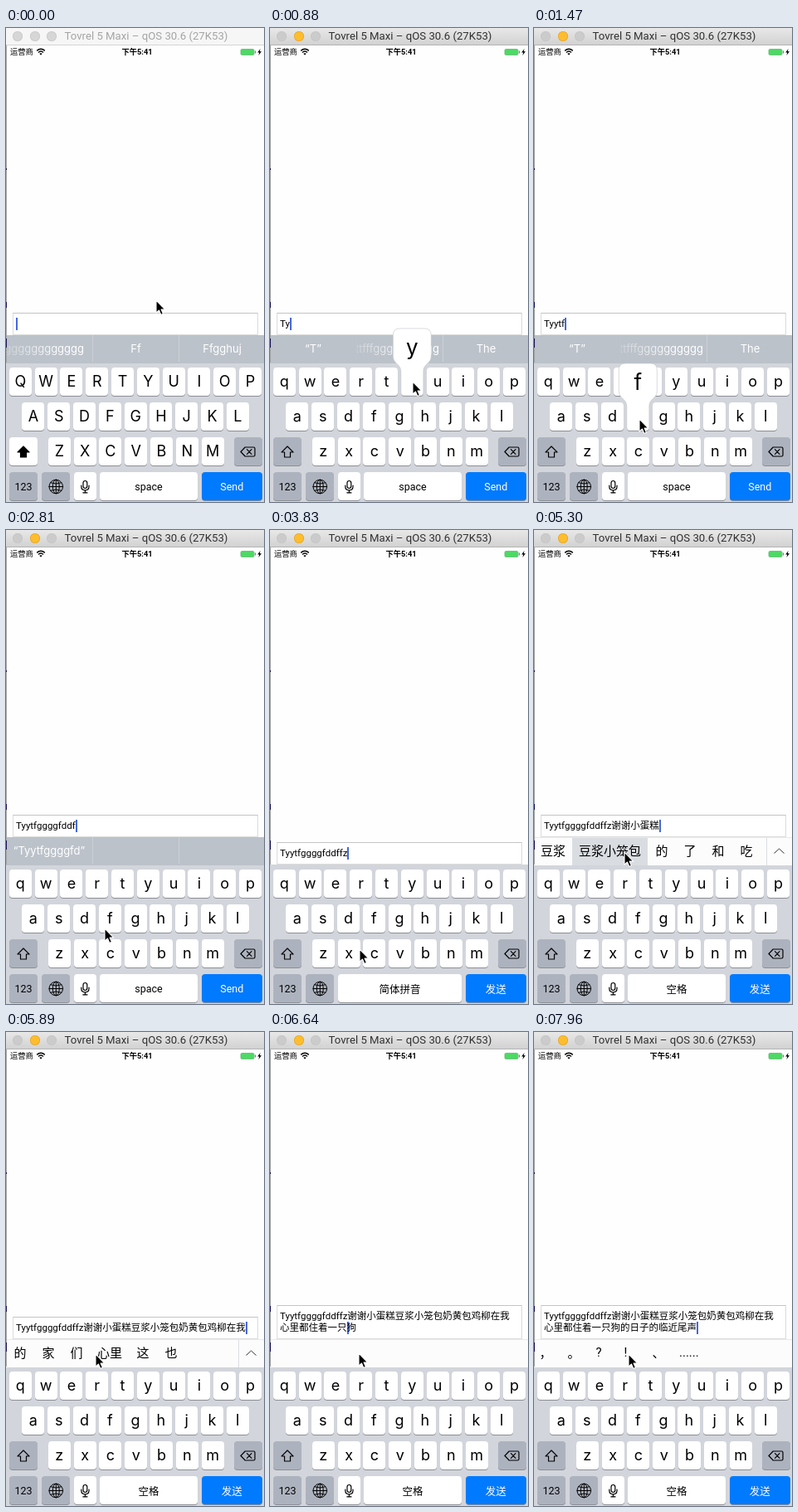
Animation, 311 px wide and 571 px high, one loop 8000 ms. Source, as an HTML page:

```html
<!DOCTYPE html>
<html lang="zh-CN">
<head>
<meta charset="utf-8">
<title>Keyboard demo</title>
<style>
html, body { margin: 0; width: 100%; height: 100%; overflow: hidden; background: #fff; }
#stage { position: absolute; left: 0; top: 0; width: 311px; height: 571px; overflow: hidden; background: #fefefe;
  font-family: Roboto, "Noto Sans CJK SC", "Noto Sans CJK", sans-serif; color: #000; }
#stage > * { position: absolute; box-sizing: border-box; }
#title { left: 0; top: 0; width: 311px; height: 21px; background: #f6f6f6; border-bottom: 1px solid #d4d4d4;
  font-size: 13.2px; line-height: 20px; text-align: center; padding-left: 27px; color: #a4a4a4; white-space: pre; }
#title i { position: absolute; top: 4px; width: 12px; height: 12px; border-radius: 50%; background: #d6d6d6;
  box-shadow: inset 0 0 0 .6px #c4c4c4; }
#title.on { background: linear-gradient(#e8e8e8, #d2d2d2); border-color: #b4b4b4; color: #303030; }
#title.on i { background: #cbcbcb; }
#title.on i:nth-of-type(2) { background: #fdbd2f; box-shadow: inset 0 0 0 .6px #dfa023; }
.status { top: 22px; font-size: 9.3px; line-height: 14px; white-space: pre; }
#field { left: 8px; width: 296px; background: #fff; border: 1px solid #dcdcdc; border-top-color: #c4c4c4;
  padding: 5px 0 0 3px; font-size: 11.5px; line-height: 14px; white-space: pre; }
#caret { display: inline-block; width: 2px; height: 15px; margin: -1px -2px -1px 0; vertical-align: -3px; background: #4468dc; }
#field u { text-decoration-color: #999; }
#board { left: 0; top: 403px; width: 311px; height: 168px; background: #d2d5db; }
#bar { left: 0; top: 370px; width: 311px; height: 34px; display: flex; overflow: hidden; }
#bar.en { background: #bbc2ca; color: #fff; font: 13px Inter, sans-serif; }
#bar.en div { width: 104px; height: 32px; flex: none; display: flex; align-items: center; justify-content: center;
  overflow: hidden; white-space: pre; box-sizing: border-box; }
#bar.en div + div { border-left: 1px solid #cbd0d6; }
#bar.en .long { justify-content: flex-end; padding-right: 4px;
  -webkit-mask-image: linear-gradient(90deg, rgba(0,0,0,.25), #000 65%); mask-image: linear-gradient(90deg, rgba(0,0,0,.25), #000 65%); }
#bar.en .long:first-child { padding-right: 10px; }
#bar.zh { background: #fcfcfd; border-top: 1px solid #e8e9eb; font-size: 15px; }
#bar.zh div { min-width: 34px; padding: 0 8px 4px; flex: none; box-sizing: border-box; display: flex; align-items: center; justify-content: center; }
#bar.zh span { min-width: 15px; }
#bar.plain span { transform: translateX(-3px); }
#bar.zh .press { background: #d9dce1; }
#bar svg { position: absolute; right: 0; top: 0; background: #fcfcfd; }
.key { height: 34px; border-radius: 4px; background: #fff; box-shadow: 0 1px 0 #8b8e93; display: flex;
  align-items: center; justify-content: center; font-size: 12.5px; white-space: pre; }
.letter { width: 27px; padding-bottom: 1px; font: 18px/1 Inter, sans-serif; }
.dark { background: #adb3be; }
.send { background: #007aff; color: #fff; }
.key.hit { background: #fff; }
svg { overflow: visible; }
</style>
</head>
<body>
<div id="stage">
  <div id="title"><i style="left:8px"></i><i style="left:29px"></i><i style="left:49px"></i>Tovrel 5 Maxi – qOS 30.6 (27K53)</div>
  <div class="status" style="left:5px">运营商</div>
  <div class="status" style="left:108px;width:100px;text-align:center;font-weight:700">下午5:41</div>
  <svg width="311" height="571" style="left:0;top:0">
    <g fill="none" stroke="#000" stroke-width="1.4">
      <path d="M37.2 27.4Q42 23.2 46.8 27.4M39 29.4Q42 26.7 45 29.4"/>
    </g>
    <path d="M40.3 30.8Q42 29.6 43.7 30.8L42 32.8Z"/>
    <rect x="283" y="25.5" width="16" height="7" rx="1.5" fill="#4cd964" stroke="#68b874" stroke-width=".8"/>
    <path d="M300.5 27.5v3" stroke="#777"/>
    <path d="M306.6 25L303.2 29.6H305.3L304.4 33L308 28.2H305.8Z"/>
  </svg>
  <div id="field"></div>
  <div id="board"></div>
  <div id="bar"></div>
  <svg id="icons" width="311" height="571" style="left:0;top:0;z-index:2">
    <path d="M.5 21V403" stroke="#a5a5a5"/>
    <path d="M.5 169v2M.5 330v7M.5 374v11" stroke="#1c1257"/>
    <path id="arrow" d="M21 504L28 511H24.5V517H17.5V511H14Z" stroke="#000" stroke-width="1.2" stroke-linejoin="round"/>
    <g fill="none" stroke="#000" stroke-width="1.2" stroke-linejoin="round" stroke-linecap="round">
      <path d="M283 510.5L288.2 505H298.5Q300 505 300 506.5V514.5Q300 516 298.5 516H288.2Z"/>
      <path d="M290.5 507.7L296 513.3M296 507.7L290.5 513.3"/>
      <g stroke-width="1">
        <circle cx="60.3" cy="552.5" r="8.3"/><ellipse cx="60.3" cy="552.5" rx="4" ry="8.3"/>
        <path d="M60.3 544.2V560.8M52 552.5H68.6M53.8 547.8Q60.3 550.5 66.8 547.8M53.8 557.2Q60.3 554.5 66.8 557.2"/>
      </g>
      <g id="mic"><rect x="93" y="545.5" width="4.8" height="9" rx="2.4"/>
        <path d="M90.8 551V552.5Q90.8 556.8 95.4 556.8T100 552.5V551M95.4 557V559.6M92.8 559.8H98"/></g>
    </g>
  </svg>
  <svg id="pop" width="1" height="1" style="left:0;top:0;z-index:3">
    <path d="M-23-39Q-23-47-15-47H15Q23-47 23-39V-14C23-4 13.5-5 13.5 5V30Q13.5 34 9.5 34H-9.5Q-13.5 34-13.5 30V5C-13.5-5-23-4-23-14Z"
      fill="#fff" stroke="#bfc3c9" stroke-width=".6"/>
    <text y="-15" text-anchor="middle" font-family="Inter, sans-serif" font-size="26"></text>
  </svg>
  <svg id="mouse" width="1" height="1" style="left:0;top:0;z-index:4">
    <path d="M0 0V15.2L3.5 12L5.8 17.4L8.4 16.3L6.1 11.1H10.8Z" stroke="#fff" stroke-width="1.1" stroke-linejoin="round"/>
  </svg>
</div>
<script>
const $ = id => document.getElementById(id);
const LOOP = 8000, WRAP = 32, PITCH = 30.8;
const TEXT = "Tyytfggggfddffz谢谢小蛋糕豆浆小笼包奶黄包鸡柳在我心里都住着一只狗的日子的临近尾声";

function addKey(x, y, w, label, cls) {
  const el = document.createElement("div");
  el.className = "key " + cls;
  el.style.cssText = `left:${x}px;top:${y}px;width:${w}px`;
  el.textContent = label;
  $("stage").insertBefore(el, $("icons"));
  return el;
}

const keys = {};
[["qwertyuiop", 3.8, 409], ["asdfghjkl", 19.4, 451], ["zxcvbnm", 50.8, 493]].forEach(([row, left, y]) =>
  [...row].forEach((c, i) => {
    const x = left + i * PITCH;
    keys[c] = { x: x + 13.5, y, el: addKey(x, y, 27, c, "letter") };
  }));
const shift = addKey(4, 493, 34, "", "dark");
addKey(275, 493, 33.5, "", "dark");
addKey(4, 535, 34, "123", "dark");
const globe = addKey(43, 535, 34, "", "dark");
const micKey = addKey(82, 535, 26.5, "", "");
const space = addKey(113, 535, 118, "", "");
const send = addKey(236, 535, 72.5, "", "send");

// Each step: time, pointer x, pointer y, changes. pop, press, back and globe last one step only.
const steps = [
  [0, 181, 328, { n: 0, caps: true, en: ["gggggggggggggg", "Ff", "Ffgghuj"], space: "space", send: "Send" }],
  [150, 177, 350, { active: true }],
  [296, 162, 393],
  [441, 145, 424],
  [587, 142, 427, { n: 1, pop: "t" }],
  [733, 160, 426, { caps: false, en: ["“T”", ".ttttfffgggggggggg", "The"] }],
  [878, 172, 426, { n: 2, pop: "y" }],
  [1024, 172, 426, { n: 3, pop: "y" }],
  [1170, 142, 428, { n: 4, pop: "t" }],
  [1320, 132, 452],
  [1470, 127, 471, { n: 5, pop: "f" }],
  [1620, 143, 471, { en: ["“Tyytf”", "", ""] }],
  [1765, 155, 470, { n: 6, pop: "g" }],
  [1915, 155, 470, { n: 7, pop: "g", en: ["“Tyytfg”", "", ""] }],
  [2060, 155, 470, { n: 8, pop: "g" }],
  [2210, 154, 471, { n: 9, pop: "g" }],
  [2360, 128, 473, { n: 10, pop: "f" }],
  [2510, 98, 475, { n: 11, pop: "d", en: ["“Tyytfggggfd”", "", ""] }],
  [2660, 98, 476, { n: 12, pop: "d" }],
  [2810, 119, 480, { n: 13 }],
  [2960, 121, 478, { n: 14, pop: "f" }],
  [3100, 92, 494],
  [3250, 66, 507, { n: 15, pop: "z" }],
  [3400, 62, 534],
  [3540, 60, 551, { globe: true }],
  [3690, 68, 545, { en: null, low: true, space: "简体拼音", send: "发送" }],
  [3830, 108, 505],
  [4130, 98, 508],
  [4280, 94, 509, { pop: "x" }],
  [4430, 90, 482, { low: false, mark: "x", zh: "谢谢 想 下 小 需要 新 像 先", space: "选定", send: "确认" }],
  [4575, 66, 432],
  [4720, 26, 390],
  [5010, 68, 389, { n: 17, mark: "", zh: "你 小蛋糕 大家 您 了 的", press: 1, space: "空格", send: "发送" }],
  [5155, 98, 388, { n: 20, zh: "豆浆 豆浆小笼包 的 了 和 吃" }],
  [5300, 109, 388, { press: 1 }],
  [5450, 108, 388, { n: 25, zh: "和 油条 奶黄包 的 了 吃", press: 2 }],
  [5595, 108, 388, { n: 28, zh: "的 和 了 鸡柳 吃 在" }],
  [5745, 108, 388, { n: 30, zh: "的 了 和 在我 吃 是" }],
  [5890, 108, 388, { n: 32, zh: "的 家 们 心里 这 也" }],
  [6040, 108, 388, { n: 34, zh: "的 是 有 都 很 就" }],
  [6190, 108, 388, { n: 35, zh: "是 有 会 住着 在 不" }],
  [6340, 107, 387, { n: 37, zh: "的 你 了 一只 我 个" }],
  [6490, 107, 387, { n: 39, zh: "猫 小 鸟 狗 手 鸡" }],
  [6640, 107, 387, { n: 40, zh: "", back: 1 }],
  [6790, 107, 387, { zh: "了 狗 是 的 在 和" }],
  [6940, 107, 387, { n: 41, zh: "人 时候 日子 我 是 你" }],
  [7080, 108, 387, { n: 43, zh: "里 了 是 的 我 也" }],
  [7220, 108, 387, { press: 3 }],
  [7370, 109, 387, { n: 44, zh: "人 我 时候 临近 你 是" }],
  [7515, 110, 388, { press: 3 }],
  [7665, 112, 388, { n: 46, zh: "的 了 时 尾声 在 是" }],
  [7810, 113, 388, { n: 48, zh: "" }],
  [7960, 114, 388, { zh: "， 。 ? ! 、 ......", plain: true }]
];

let base = {};
const states = steps.map(([t, x, y, change]) => {
  base = { ...base, pop: "", press: -1, back: 0, globe: false, ...change };
  return { ...base, t, x, y };
});

const broken = (from, to) =>
  from < WRAP && to > WRAP ? TEXT.slice(from, WRAP) + "\n" + TEXT.slice(WRAP, to) : TEXT.slice(from, to);

function drawField(s) {
  const tall = s.n > WRAP, bottom = s.low ? 403 : 369.5, h = tall ? 40.5 : 27;
  $("field").style.top = bottom - h + "px";
  $("field").style.height = h + "px";
  const at = s.n - s.back;
  $("field").innerHTML = broken(0, at) + (s.mark ? `<u>${s.mark}</u>` : "") +
    '<span id="caret"></span>' + broken(at, s.n);
}

function drawBar(s) {
  const bar = $("bar");
  bar.style.display = s.low ? "none" : "flex";
  bar.className = s.en ? "en" : s.plain ? "zh plain" : "zh";
  if (s.en) {
    bar.innerHTML = s.en.map(w => `<div class="${/^[^“].{11}/.test(w) ? "long" : ""}">${w}</div>`).join("");
    return;
  }
  if (!s.zh) { bar.innerHTML = ""; return; }
  bar.innerHTML = s.zh.split(" ").map((w, i) =>
    `<div class="${i === s.press ? "press" : ""}"><span>${w}</span></div>`).join("") +
    (s.plain ? "" : '<svg width="31" height="33"><path d="M.5 0V33" stroke="#dcdde0"/>' +
      '<path d="M9.5 18.5L15.5 13L21.5 18.5" fill="none" stroke="#333"/></svg>');
}

function draw(s) {
  $("title").className = s.active ? "on" : "";
  drawField(s);
  drawBar(s);
  const cased = c => s.caps ? c.toUpperCase() : c;
  for (const c in keys) keys[c].el.textContent = cased(c);
  shift.classList.toggle("dark", !s.caps);
  $("arrow").setAttribute("fill", s.caps ? "#000" : "none");
  globe.classList.toggle("hit", s.globe);
  micKey.style.display = $("mic").style.display = s.low ? "none" : "";
  space.style.left = (s.low ? 82 : 113) + "px";
  space.style.width = (s.low ? 149 : 118) + "px";
  space.textContent = s.space;
  send.textContent = s.send;
  const pop = $("pop"), key = keys[s.pop];
  pop.style.display = key ? "" : "none";
  if (key) {
    pop.style.transform = `translate(${key.x}px,${key.y}px)`;
    pop.querySelector("text").textContent = cased(s.pop);
  }
  $("mouse").style.transform = `translate(${s.x}px,${s.y}px)`;
}

let shown = -1;
function tick() {
  const t = performance.now() % LOOP;
  let i = states.length - 1;
  while (states[i].t > t) i--;
  if (i !== shown) draw(states[shown = i]);
  requestAnimationFrame(tick);
}
tick();
</script>
</body>
</html>
```
